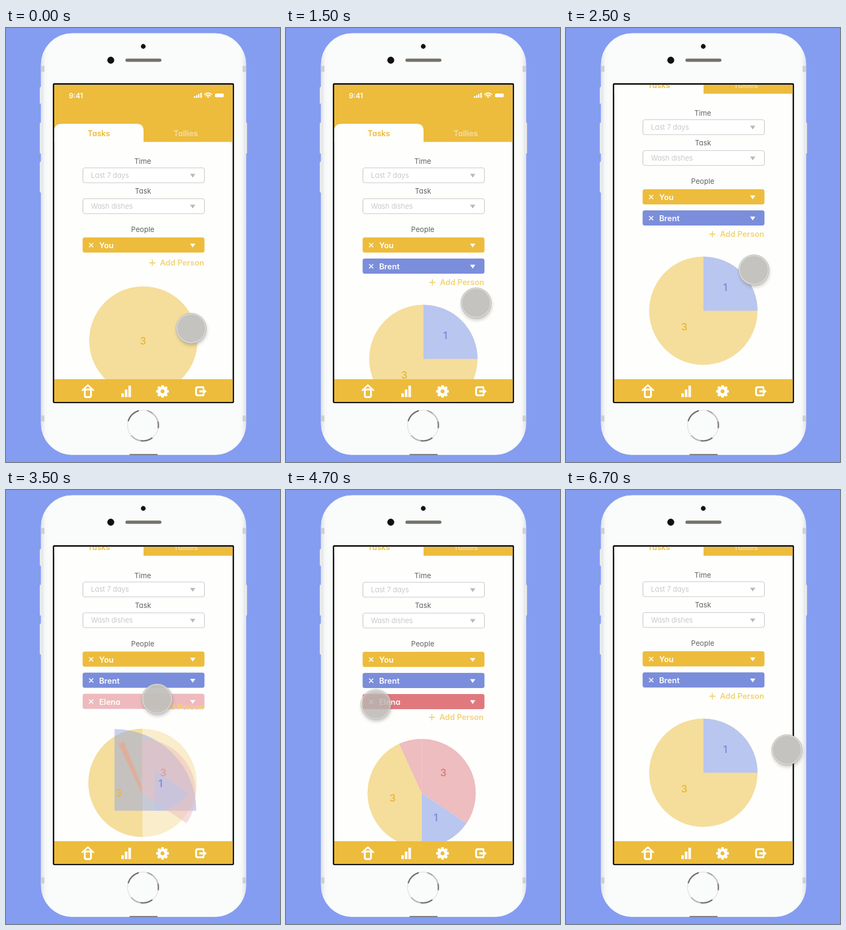
These frames come from a looping animation (506 by 802 pixels, 6.8 s). An HTML page:

```html
<!DOCTYPE html>
<html lang="en">
<head>
<meta charset="utf-8">
<title>Task charts</title>
<style>
html, body { margin: 0; width: 100%; height: 100%; overflow: hidden; background: #849df1; }
svg { display: block; width: 506px; height: 802px; }
text { font-family: Inter, Lato, sans-serif; font-feature-settings: "cv11"; }
.mid { text-anchor: middle; }
.label { font-size: 13.2px; fill: #626262; text-anchor: middle; }
.hint { font-size: 13px; font-weight: 300; fill: #b9b9b9; }
.name { font-size: 14.6px; font-weight: 600; fill: #fff; }
.tab { font-size: 14.4px; font-weight: 600; text-anchor: middle; }
.num { font-size: 18px; font-weight: 600; text-anchor: middle; }
.field { fill: #fff; stroke: #c6c6c6; stroke-width: 1.2; }
.line { fill: none; stroke-linecap: round; stroke-linejoin: round; }
</style>
</head>
<body>
<svg viewBox="0 0 506 802">
  <defs>
    <linearGradient id="edge">
      <stop offset="0" stop-color="#dfe2e6"/><stop offset=".018" stop-color="#f6f7f8"/>
      <stop offset=".035" stop-color="#fafcfb"/><stop offset=".965" stop-color="#fafcfb"/>
      <stop offset=".982" stop-color="#f6f7f8"/><stop offset="1" stop-color="#dfe2e6"/>
    </linearGradient>
    <clipPath id="screen"><rect x="89" y="105" width="329.5" height="585.5"/></clipPath>
    <filter id="soft" x="-40%" y="-40%" width="180%" height="180%"><feGaussianBlur stdDeviation="3"/></filter>
    <path id="drop" d="M340 -3h9.6l-4.8 7z"/>
    <path id="cross" class="line" d="M154 -3.3l6.6 6.6m0 -6.6l-6.6 6.6" stroke="#fff" stroke-width="1.7"/>
  </defs>

  <!-- phone body -->
  <g fill="#eceef0" stroke="#c9c6c4" stroke-width=".6">
    <rect x="62.5" y="109" width="4" height="31" rx="1.5"/>
    <rect x="62.5" y="175" width="4" height="57" rx="1.5"/>
    <rect x="62.5" y="247" width="4" height="57" rx="1.5"/>
    <rect x="441" y="175" width="4" height="57" rx="1.5"/>
  </g>
  <rect x="65" y="10" width="378" height="778.5" rx="57" fill="url(#edge)" stroke="#eef0f4"/>
  <path d="M65 70h6v11h-6zM437 70h6v11h-6zM65 716h6v11h-6zM437 716h6v11h-6z" fill="#cfd0d0"/>
  <path d="M229 788.2h50" stroke="#777269" stroke-width="2" class="line"/>
  <circle cx="193.5" cy="59.5" r="6.4" fill="#12100f"/>
  <circle cx="253.5" cy="34" r="4.4" fill="#12100f"/>
  <rect x="220.5" y="56.5" width="66.5" height="6" rx="3" fill="#76726b"/>
  <g id="home" class="line" transform="translate(253 734.5)" stroke-width="2.6">
    <circle r="28.5" stroke="#e3e3e3" stroke-width="1.6"/>
  </g>
  <rect x="87.8" y="103.4" width="332" height="588.6" rx="1.5" fill="#fefefd" stroke="#0c0b08" stroke-width="2.6"/>

  <g clip-path="url(#screen)">
    <g id="page">
      <rect x="88" y="100" width="332" height="110.5" fill="#edbc3c"/>
      <path d="M88 211V192Q89 177 103 177H241Q254 177 254 190V211z" fill="#fefefd"/>
      <text x="116" y="129.5" font-size="13" font-weight="600" fill="#fff">9:41</text>
      <path d="M347 126h2.6v3H347zM350.8 124.300h2.6v4.700h-2.6zM354.600 122h2.6v7h-2.6zM358.800 119.800h2.8v9.200h-2.8z" fill="#fff"/>
      <g class="line" stroke="#fff" stroke-width="2.1" stroke-linecap="butt">
        <path d="M367 122.600q6.200 -5 12.400 0M369.500 125.400q3.700 -3 7.400 0"/>
      </g>
      <path d="M371 127l2.200 2.500 2.200 -2.500q-2.200 -1.500 -4.400 0z" fill="#fff"/>
      <rect x="386" y="121" width="16" height="7" rx="1.8" fill="#fff"/>
      <text class="tab" x="171.500" y="200" fill="#edbc3c">Tasks</text>
      <text class="tab" x="332" y="200" fill="#f6dfa3">Tallies</text>

      <g id="form">
        <text class="label" x="252.500" y="251">Time</text>
        <rect class="field" x="142" y="258.500" width="224.500" height="27.500" rx="4"/>
        <text class="hint" x="157" y="276.500">Last 7 days</text>
        <use href="#drop" y="272.500" fill="#b9b9b9"/>
        <text class="label" x="253" y="306">Task</text>
        <rect class="field" x="142" y="315.500" width="224.500" height="27.500" rx="4"/>
        <text class="hint" x="157" y="333.500">Wash dishes</text>
        <use href="#drop" y="329.500" fill="#b9b9b9"/>
        <text class="label" x="252.500" y="377">People</text>
      </g>

      <g id="pie"></g>
      <g id="add">
        <path class="line" d="M265.300 0h10m-5 -5v10" stroke="#f3d376" stroke-width="1.9"/>
        <text x="366" y="5.200" font-size="14.600" font-weight="600" text-anchor="end" fill="#f3d376">Add Person</text>
      </g>
    </g>

    <rect x="88" y="649" width="332" height="43" fill="#edbc3c"/>
    <g class="line" stroke="#fff" stroke-width="3.4">
      <path d="M141 669.500l10.200 -9.500 10.200 9.500" stroke-width="3"/>
      <rect x="145.500" y="668" width="11.500" height="14" rx="2.500"/>
      <path d="M364.500 666v-2.200h-10q-3.500 0 -3.500 3.500v8q0 3.500 3.500 3.500h10v-2.200"/>
    </g>
    <path d="M357 669.500h7v-3.800l6.700 5.800 -6.700 5.800v-3.800h-7z" fill="#fff"/>
    <path d="M213 675h4.600v7H213zM219.500 668h4.800v14h-4.800zM226 661h4.800v21H226z" fill="#fff"/>
    <g transform="translate(289 671.500)">
      <g id="gear" fill="#fff"></g>
      <circle r="6.300" fill="none" stroke="#fff" stroke-width="5.200"/>
    </g>
  </g>

  <g id="cursor">
    <circle cy="4" cx="1" r="27.500" fill="#55504b" opacity=".33" filter="url(#soft)"/>
    <g id="disc">
      <circle r="28" fill="#c4c3bf" stroke="#b3b1ad" stroke-width=".8"/>
      <circle r="26.600" fill="none" stroke="#e3e2e0" stroke-width="1.300"/>
    </g>
  </g>
</svg>
<script>
const LOOP = 6800, STEP = 100;
const $ = id => document.getElementById(id);
const mix = (a, b, p) => a + (b - a) * p;
const clamp = x => Math.max(0, Math.min(1, x));
const ramp = (t, a, b) => clamp((t - a) / (b - a));
const smooth = p => p * p * (3 - 2 * p);
const move = (node, x, y, s = 1) => node.setAttribute('transform', `translate(${x} ${y}) scale(${s})`);
const fade = (node, o) => node.setAttribute('opacity', o);

function add(parent, tag, attrs, text) {
  const node = document.createElementNS('http://www.w3.org/2000/svg', tag);
  for (const k in attrs) node.setAttribute(k, attrs[k]);
  if (text) node.textContent = text;
  parent.append(node);
  return node;
}

// Angles run clockwise in degrees from twelve o'clock.
function point(deg, r) {
  const a = deg * Math.PI / 180;
  return `${(r * Math.sin(a)).toFixed(2)} ${(-r * Math.cos(a)).toFixed(2)}`;
}
function arc(from, to, r) {
  return `${point(from, r)}A${r} ${r} 0 ${to - from > 180 ? 1 : 0} 1 ${point(to, r)}`;
}
const wedge = (from, to, r = 100) => `M0 0L${arc(from, to, r)}z`;

for (const [from, to, color] of [[-72, -18, '#77726c'], [18, 40, '#aaa'], [40, 78, '#c9c5c0'],
                                 [78, 98, '#807a74'], [145, 190, '#77726c'], [190, 228, '#bdbab6']])
  add($('home'), 'path', { d: 'M' + arc(from, to, 28.5), stroke: color });

for (let i = 0; i < 8; i++)
  add($('gear'), 'path', { d: 'M-3 -7L-2.2 -11.6H2.2L3 -7z', transform: `rotate(${i * 45})` });

function pill(y, color, name) {
  const g = add($('form'), 'g', {});
  add(g, 'rect', { x: 141.5, y, width: 225, height: 28, rx: 4, fill: color });
  add(g, 'use', { href: '#cross', y: y + 14.3 });
  add(g, 'text', { class: 'name', x: 172, y: y + 20 }, name);
  add(g, 'use', { href: '#drop', y: y + 14.5, fill: '#fff' });
  return g;
}
pill(387, '#edbc3c', 'You');
const second = pill(426, '#7b8edb', 'Brent');
const third = pill(465, '#e0797e', 'Elena');

const pie = $('pie');
const shape = (d, fill) => add(pie, 'path', { d, fill });
const number = (n, fill) => add(pie, 'text', { class: 'num', fill, y: 6.5 }, n);
const base = add(pie, 'circle', { r: 100, fill: '#f5de9b' });
const half = shape(wedge(180, 360), '#f5de9b');
const quarter = shape('M0 1V0A1 1 0 0 1 1 1z', '#b9c6ef');
const pinkLeft = shape(wedge(-24.5, 0), '#edbdbf');
const pinkRight = shape(wedge(0, 124), '#edbdbf');
const sliver = shape('M-43 -91L-33 -95L0 -13V0z', '#dfae9a');
const small = shape(wedge(124, 180), '#b9c6ef');
const yellowNum = number('3', '#e8b840');
const blueNum = number('1', '#7b8edb');
const pinkNum = number('3', '#df7a7f');

// time, x, y, disc opacity
const path = [
  [0, 342, 555, 1], [700, 320, 440, 1], [900, 320, 438, .88], [1100, 322, 442, 1],
  [1500, 351, 508, 1], [1700, 352, 520, 1], [2200, 349, 431, 1], [2500, 347, 447, 1],
  [3200, 279, 386, 1], [3500, 279, 386, .92], [3800, 274, 387, 1], [4500, 166, 396, 1],
  [4700, 166, 396, .74], [5100, 164, 395, 1], [5700, 158, 392, 1], [6700, 408, 480, 1], [6800, 416, 486, 1]
];

function drawCursor(t) {
  const i = path.findIndex(k => k[0] > t), a = path[i - 1], b = path[i];
  const p = smooth(ramp(t, a[0], b[0]));
  move($('cursor'), mix(a[1], b[1], p), mix(a[2], b[2], p));
  fade($('disc'), mix(a[3], b[3], p));
}

function draw(t) {
  const p = smooth(ramp(t, 900, 1300));
  const q = smooth(ramp(t, 3300, 3700)) - smooth(ramp(t, 4700, 5100));
  move($('page'), 0, -89 * smooth(ramp(t, 1700, 2200)));
  move($('form'), 0, q);
  fade(second, p);
  fade(third, q);
  move($('add'), -q, mix(mix(434, 470, p), 509, q));

  const cx = mix(253.7, 250.5, q), cy = mix(mix(577.5, 611.5, p), 649, q);
  move(base, cx, cy);
  move(half, cx, cy);
  fade(base, 1 - q);

  const size = mix(100, 202, q);
  move(quarter, mix(253.7, 147, q), mix(cy - 100, 550, q * (q < 1)), size);
  if (q > 0) move(quarter, mix(253.7, 147, q), mix(511.5, 550, q), size);
  quarter.setAttribute('fill', `rgb(${185 - 70 * q},${198 - 66 * q},${239 - 28 * q})`);
  fade(quarter, p * (1 - q));

  for (const node of [pinkLeft, pinkRight, sliver]) move(node, 250.5, 649);
  fade(pinkLeft, clamp(2 * q - 1));
  fade(pinkRight, q);
  fade(sliver, 4 * q * (1 - q));
  move(small, mix(299.5, 250.5, q), mix(565, 649, q), mix(.5, 1, q));
  fade(small, q);

  move(yellowNum, mix(mix(253, 218.5, p), 197, q), mix(mix(578, 641, p), 658, q));
  move(blueNum, mix(294, 276.5, q), mix(568, 694, q));
  fade(blueNum, p);
  move(pinkNum, 290.5, 611);
  fade(pinkNum, q);
  drawCursor(t);
}

function tick() {
  draw(Math.floor(performance.now() % LOOP / STEP) * STEP);
  requestAnimationFrame(tick);
}
tick();
</script>
</body>
</html>
```
